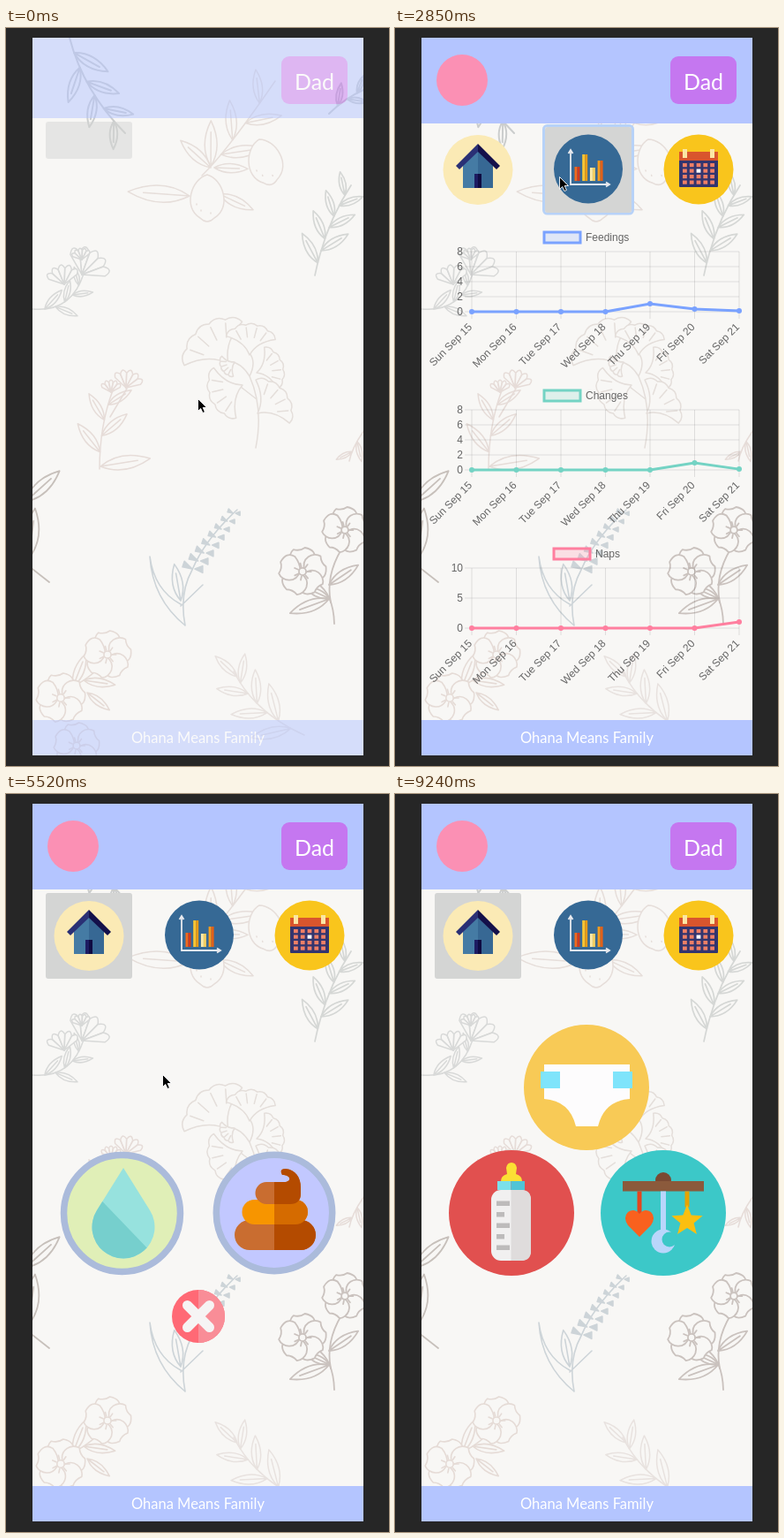
Animation of 434x835 px, one loop 9840 ms. Source, as an HTML page:

```html
<!DOCTYPE html>
<html lang="en">
<head>
<meta charset="utf-8">
<title>Baby tracker</title>
<style>
html, body { margin: 0; width: 100%; height: 100%; overflow: hidden; background: #262626; }
svg { display: block; width: 100vw; height: 100vh; }
text { font-family: Lato, sans-serif; font-weight: 400; }
.bold { font-family: "Liberation Sans", Arial, sans-serif; font-weight: 700; }
.plain { font-family: "Liberation Sans", Arial, sans-serif; }
.mid { text-anchor: middle; }
.end { text-anchor: end; }
#dodge { mix-blend-mode: color-dodge; }
</style>
</head>
<body>
<svg id="stage" viewBox="0 0 434 835" preserveAspectRatio="none"></svg>
<script>
const paper = '#f8f7f5';
const rect = (x, y, w, h, fill, more = '') =>
  `<rect x="${x}" y="${y}" width="${w}" height="${h}" fill="${fill}" ${more}/>`;
const disc = (x, y, r, fill, more = '') => `<circle cx="${x}" cy="${y}" r="${r}" fill="${fill}" ${more}/>`;
const path = (d, fill = 'none', more = '') => `<path d="${d}" fill="${fill}" ${more}/>`;
const line = (d, color, width, more = '') => path(d, 'none', `stroke="${color}" stroke-width="${width}" ${more}`);
const text = (x, y, size, str, cls = 'mid', fill = '#333', more = '') =>
  `<text x="${x}" y="${y}" font-size="${size}" class="${cls}" fill="${fill}" ${more}>${str}</text>`;
const group = (id, body) => `<g id="${id}">${body}</g>`;
const place = (x, y, turn, body) => `<g transform="translate(${x} ${y}) rotate(${turn})">${body}</g>`;
const repeat = (n, fn) => Array.from({ length: n }, (_, i) => fn(i)).join('');
const polar = (r, deg) => [r * Math.cos(deg * Math.PI / 180), r * Math.sin(deg * Math.PI / 180)].map(v => +v.toFixed(1));

// Botanical background
const leaf = (x, y, turn, len) => place(x, y, turn,
  path(`M0 0Q${len * .45} ${-len * .27} ${len} 0Q${len * .45} ${len * .27} 0 0H${len * .75}`));

// Curved stem with alternating leaves that shrink towards the tip
function sprig([x0, y0, cx, cy, x1, y1], n, len) {
  const bend = (a, b, c, t) => (1 - t) ** 2 * a + 2 * t * (1 - t) * b + t * t * c;
  const slope = (a, b, c, t) => (1 - t) * (b - a) + t * (c - b);
  return path(`M${x0} ${y0}Q${cx} ${cy} ${x1} ${y1}`) + repeat(n, i => {
    const t = (i + 1) / (n + 1);
    const turn = Math.atan2(slope(y0, cy, y1, t), slope(x0, cx, x1, t)) * 180 / Math.PI;
    return leaf(bend(x0, cx, x1, t), bend(y0, cy, y1, t), turn + (i % 2 ? 42 : -42), len * (1.1 - t * .4));
  });
}
function fan(x, y, turn, r) {
  const lobes = repeat(5, i => `Q${polar(r * 1.13, i * 22 - 44)} ${polar(r, i * 22 - 33)}`);
  const ribs = repeat(4, i => `M${polar(r * .6, i * 22 - 33)}L${polar(r * .92, i * 22 - 33)}`);
  return place(x, y, turn, path(`M0 0Q${polar(r * .5, -25)} ${polar(r, -55)}${lobes}Q${polar(r * .5, 25)} 0 0${ribs}`, paper));
}
function bloom(x, y, r) {
  const petal = `M${r * .1} 0C${r * .1} ${-r * .6} ${r * .7} ${-r * .65} ${r * .92} ${-r * .38}` +
    `Q${r * .85} ${-r * .1} ${r} ${r * .1}Q${r * .9} ${r * .6} ${r * .5} ${r * .5}Q${r * .2} ${r * .3} ${r * .1} 0`;
  return place(x, y, 0, repeat(5, i => place(0, 0, i * 72 - 90, path(petal, paper))) +
    disc(0, 0, r * .15, paper) + repeat(7, i => path(`M${polar(r * .2, i * 51)}L${polar(r * .36, i * 51)}`)));
}
const cup = (x, y, turn, r) => place(x, y, turn, repeat(5, i => place(0, 0, i * 25 - 50,
  path(`M0 0L${r * .75} ${-r * .16}Q${r * 1.1} 0 ${r * .75} ${r * .16}Z`, paper))));
const tuft = (x, y, s) => path(`M${x} ${y}l${-s} ${-s * .2}l${s * .2} ${-s * .6}ZM${x + 3} ${y}l${s * .8} ${-s * .3}v${s * .7}Z`, '#cdd4d8');
const ink = (color, width, ...parts) =>
  `<g stroke="${color}" stroke-width="${width}" fill="none" stroke-linecap="round" stroke-linejoin="round">${parts.join('')}</g>`;

const lemon = path('M0 -27C-18 -22 -28 10 -8 22Q0 30 8 22C28 10 18 -22 0 -27ZM-12 6v1M-7 13v1M4 16v1', paper);
const plants = [
  ink('#cbcdcd', 2, sprig([72, 11, 88, 72, 135, 119], 6, 42), sprig([366, 97, 385, 78, 410, 68], 3, 26)),
  ink('#e6deda', 1.5, sprig([222, 167, 250, 140, 305, 60], 5, 50), leaf(208, 190, 184, 70), leaf(242, 188, 25, 42),
    leaf(232, 158, 222, 46), leaf(236, 158, 2, 38), place(228, 193, 0, lemon), place(294, 152, -15, lemon)),
  ink('#d5d7d5', 1.7, sprig([350, 280, 362, 222, 391, 178], 7, 36)),
  ink('#d8d9d8', 1.5, sprig([30, 318, 74, 322, 88, 278], 5, 28), cup(86, 279, -58, 34), cup(66, 290, -100, 24), cup(86, 262, -100, 14)),
  ink('#e4deda', 1.5, path('M283 475Q292 430 276 394Q264 374 246 378M276 394Q284 378 276 368M284 420L266 406'),
    fan(252, 380, -127, 50), fan(276, 370, -86, 34), fan(284, 390, -18, 30), fan(268, 404, 156, 38), fan(285, 436, -38, 38), fan(259, 378, 150, 16)),
  ink('#e6dcd8', 1.5, sprig([106, 499, 106, 450, 121, 410], 4, 40), leaf(107, 496, -9, 57),
    cup(119, 412, -90, 15), cup(136, 407, -75, 22), path('M118 440L137 408'), sprig([406, 455, 392, 475, 389, 490], 2, 24)),
  ink('#c7c0bb', 1.8, leaf(22, 536, -42, 52), leaf(26, 600, -83, 57), path('M22 606L49 627')),
  ink('#cdd4d8', 1.6, path('M203 676Q196 640 211 613Q226 578 262 545M203 676Q166 646 163 598Q168 636 198 652M198 654L223 630'),
    leaf(198, 648, -100, 42), repeat(8, i => tuft(211 + i * 6.6, 612 - i * 9, 11 - i * .7))),
  ink('#cac2be', 1.8, sprig([372, 674, 371, 640, 352, 628], 1, 34), path('M368 650Q362 620 380 590'), leaf(366, 646, 160, 47),
    leaf(366, 630, -34, 40), bloom(336, 615, 27), bloom(384, 568, 26)),
  ink('#e5dbd6', 1.6, sprig([64, 750, 88, 742, 112, 718], 3, 40), leaf(92, 752, 38, 32), bloom(62, 758, 28), bloom(115, 709, 27), bloom(80, 812, 26)),
  ink('#e8e2df', 1.5, sprig([338, 800, 282, 775, 258, 728], 6, 44), leaf(262, 734, -137, 34))
].join('');

// Navigation
const tabX = [94, 219, 344];
const ring = x => rect(x - 50.5, 110.5, 101, 99.5, 'none', 'rx="4" stroke="#b7d2f8" stroke-width="3"');
const marks = tabX.map((x, i) => group('mark' + i, (i ? ring(x) : '') +
  rect(x - 49, 112, 98, 97, '#d4d5d4', `rx="3" id="tab${i}"`))).join('');
const bar = (i, h, a, b) => rect(203.5 + i * 8.7, 173 - h, 3, h, a) + rect(206.5 + i * 8.7, 173 - h, 3, h, b);
const icons =
  disc(76, 59, 29, '#fb90b4') + disc(94, 160.5, 39.5, '#fbeab5') +
  path('M77 152L94 137V181H77Z', '#457ba4') + path('M94 137L111 152V181H94Z', '#376894') +
  path('M94 131V140L73 160L69 156Z', '#2a3075') + path('M94 131L119 156L115 160L94 140Z', '#14104a') +
  rect(90, 165, 4, 16, '#1d1c62') + rect(94, 165, 4, 16, '#0f0b42') +
  disc(219, 159.5, 39, '#366995') +
  line('M199 139V177H242M196.500 142L199 138L201.500 142M239 174.500L243 177L239 179.500', '#e7e9ee', 1.8) +
  bar(0, 16, '#f26a1c', '#d2391c') + bar(1, 30, '#f9c634', '#e79b17') +
  bar(2, 15, '#fbeaa8', '#f3cf61') + bar(3, 23, '#f59c1d', '#e0611b') +
  disc(344, 160, 39.5, '#f9c51c') + rect(322, 140, 44, 40, '#33356e', 'rx="1"') + rect(322, 140, 44, 10, '#d9552d') +
  rect(326, 137, 5, 10, '#fbe6a4') + rect(357, 137, 5, 10, '#fbe6a4') +
  repeat(20, i => rect(326 + i % 5 * 7.8, 153 + Math.floor(i / 5) * 6.5, 4.8, 4.2, i == 7 ? '#fff' : '#ef7f66'));

// Home menu
const star = 'M' + Array.from({ length: 10 }, (_, i) => polar(i % 2 ? 8 : 18.5, i * 36 - 90)).join('L') + 'Z';
const home =
  disc(217, 332, 71, '#f8ca56') + path('M169 306H266V345Q237 347 230 376H205Q198 347 169 345Z', '#fdfcfd') +
  rect(165, 314, 22, 19, '#7fe4fb') + rect(247, 314, 22, 19, '#7fe4fb') +
  disc(132, 474, 71, '#e1504f') +
  path('M120 438Q120 432 127 430L126 423Q127 417 132 417Q137 417 138 423L137 430Q144 432 144 438Z', '#fbdf34') +
  rect(116, 438, 15.5, 10, '#7be0ea') + rect(131.5, 438, 15.5, 10, '#50c4d6') +
  rect(109, 448, 45, 80, '#f1f0f0', 'rx="11"') + path('M131.500 448H143Q154 448 154 459V517Q154 528 143 528H131.500Z', '#dfdcdc') +
  repeat(5, i => rect(115, 460.5 + i * 12.5, i % 2 ? 9 : 15, 5.5, '#bdbbbb')) +
  disc(304, 474, 71, '#3cc8c8') + disc(304, 437, 9, '#7a4a33') + rect(258, 438, 92, 11.5, '#8b5a3c') +
  rect(274.5, 449.5, 5, 26, '#e2461f') + rect(301, 449.5, 6, 44, '#b9d6fb') + rect(328.5, 449.5, 5, 18, '#e6a300') +
  path('M277 501L264 488Q258 479 264 473Q271 468 277 475Q283 468 290 473Q296 479 290 488Z', '#f9611e') +
  disc(304, 506, 13.5, '#b9d6fb') + disc(311, 504, 8.5, '#3cc8c8') +
  path(star, '#fbbf10', 'transform="translate(331 483)"');

// Diaper menu
const swirl = 'M295 439H313C324 440 324 431 313 431Q309 424 317 424C328 425 334 434 334 445V452Q334 464 322 464H295A12.500 12.500 0 0 1 295 439Z';
const pile = (a, b) => rect(259, 482, 92, 34, a, 'rx="17"') + rect(267.5, 459, 74.5, 28, b, 'rx="14"') + path(swirl, a);
const drop = 'M133 423L103 471A35.500 35.500 0 1 0 163 471Z';
const rim = 'stroke="#abbbdb" stroke-width="7.500"';
const diaper =
  disc(131.5, 474.5, 66, '#e0efb7', rim) + path(drop, '#97e2de') +
  path('M90 441L166 520L150 530H90Z', '#76cfcd', 'clip-path="url(#drop)"') +
  disc(304, 474, 65.7, '#c2c8ff', rim) + pile('#c96d30', '#f79500') +
  `<g clip-path="url(#half)">${pile('#b44b00', '#d56b00')}</g>`;
const cancel = disc(218, 591, 30, '#ff6975') + path('M218 561A30 30 0 0 1 218 621Z', '#f98d97') +
  line('M205.500 578.500l25 25m0 -25l-25 25', '#f6f4f4', 11, 'stroke-linecap="round"');

// Charts: flat until the peak day, then falling by a fixed ratio
const days = ['Sun', 'Mon', 'Tue', 'Wed', 'Thu', 'Fri', 'Sat'];
function chart(y, name, legendX, color, peak, height, ratio, top, step) {
  const rows = top / step + 1, dayX = i => 87 + i * 50.5, rowY = i => y - i * 68 / (rows - 1);
  const dots = days.map((_, i) => [dayX(i), y - (i < peak ? 0 : height / ratio ** (i - peak))]);
  const grid = repeat(rows, i => `M79 ${rowY(i)}H390`) + repeat(7, i => `M${dayX(i)} ${y - 68}V${y + 8}`);
  return rect(legendX, y - 90, 41, 12, color, `fill-opacity=".2" stroke="${color}" stroke-width="3"`) +
    text(legendX + 47, y - 80, 12, name, 'plain', '#666') + line(grid, '#000', 1, 'stroke-opacity=".1"') +
    repeat(rows, i => text(77, rowY(i) + 4, 12, i * step, 'plain end', '#666')) +
    line('M' + dots.join('L'), color, 3) + dots.map(([cx, cy]) => disc(cx, cy, 3, color)).join('') +
    days.map((d, i) => text(0, 0, 12, `${d} Sep ${15 + i}`, 'plain end', '#666',
      `transform="translate(${dayX(i) + 1} ${y + 18}) rotate(-45)"`)).join('');
}
const charts = chart(321, 'Feedings', 169, '#7aa2ff', 4, 9, 3, 8, 2) +
  chart(500, 'Changes', 169, '#74d3c4', 5, 8, 9, 8, 2) + chart(679, 'Naps', 180, '#ff7f9f', 6, 7, 1, 10, 5);

// Calendar: one digit of activity per day
const cellW = 375 / 7, hair = '#ebe9ea', frame = '#e6e6e6';
const heat = '031200000004010431', tints = ['none', '#f3e3ee', '#e2bedb', '#c1a4c1', '#b86aa1'];
function cell(i) {
  const x = 30 + i % 7 * cellW, y = 300.5 + Math.floor(i / 7) * 41;
  return rect(x, y, cellW, 41, tints[heat[i] || 0], `stroke="${hair}"`) +
    text(x + cellW - 13.5, y + 24, 13, i % 30 + 1, 'bold end', '#111');
}
const calendar = rect(30, 213, 375, 610, '#fdfdfd') + line('M30 213.500H405M30 266.500H405', hair, 1) +
  line('M58 233l-5 4l5 4M377 233l5 4l-5 4', '#111', 2) + text(217.5, 246, 20, 'SEPTEMBER 2019', 'bold mid', '#111') +
  days.map((d, i) => text(57 + i * cellW, 287, 11, d.toUpperCase())).join('') +
  repeat(35, cell) + text(217.5, 540, 22, 'Select a Date') +
  rect(32, 556, 371, 266, 'none', `stroke="${frame}" stroke-width="2"`) +
  line('M31 606H404' + repeat(3, i => `M${124.5 + i * 92.5} 556V606`), frame, 1.5) +
  ['Time', 'Type', 'Edit', 'Delete'].map((s, i) => text(78 + i * 92.7, 587, 16, s)).join('');

const popup = rect(39, 238, 357, 59, '#fff', 'rx="4"') + disc(95.5, 268, 12.5, '#98cc5c') +
  line('M89 268L94 273L103 263', '#fff', 2.5) + text(251, 273, 16, 'New entry has been recorded!', 'mid', '#222');
const pointer = path('M.5 .5V14.500L3.700 11.500L6 16.500L8.400 15.400L6.200 10.500H10.500Z', '#000', 'stroke="#fff" stroke-width=".9"');

document.getElementById('stage').innerHTML =
  `<defs><clipPath id="screen">${rect(30, 11, 375, 812, '#000')}</clipPath>` +
  `<clipPath id="half">${rect(304, 420, 60, 100, '#000')}</clipPath><clipPath id="drop">${path(drop, '#000')}</clipPath></defs>` +
  rect(0, 0, 434, 835, '#262626') + rect(30, 11, 375, 812, paper) + `<g clip-path="url(#screen)">${plants}</g>` +
  rect(30, 108, 375, 105, '#060606', 'id="dodge"') +
  group('app', rect(30, 11, 375, 97, '#b4c5ff', 'id="header"') + rect(30, 783, 375, 40, '#b4c5ff') +
    text(217.5, 809, 16.5, 'Ohana Means Family', 'mid', '#fff') +
    rect(312, 32, 75, 54, '#c577f0', 'rx="9"') + text(349.5, 69.5, 25, 'Dad', 'mid', '#fff') + marks + group('icons', icons)) +
  group('charts', charts) + group('calendar', calendar) + group('home', home) + group('diaper', diaper) +
  group('cancel', cancel) + group('shade', rect(30, 11, 375, 812, '#000', 'opacity=".46"')) + group('popup', popup) + group('cursor', pointer);

// Visible spans in steps: [from, to, rise, fall]
const spans = {
  app: [[-3, 99, 6]], icons: [[0, 99]], cursor: [[-1, 62]],
  home: [[0, 13, 7], [29, 34, 3], [50, 99, 2]],
  mark0: [[-1, 16, 1, 3], [29, 99, 2]], mark1: [[13, 23, 3, 2]], mark2: [[21, 31, 2, 2]],
  charts: [[12, 22, 7]], calendar: [[21, 30, 3]], dodge: [[21, 30, 3]],
  diaper: [[33, 51, 4]], cancel: [[33, 44, 4]],
  shade: [[44, 50, 2, 2]], popup: [[44, 50, 3, 2]]
};
const level = (k, [from, to, rise = 1, fall = 1]) => Math.max(0, Math.min(1, (k - from) / rise, (to - k) / fall));

// Pointer stops: [arrive, leave, x, y], slowing down into each
const stops = [[0, 5, 217, 419], [9, 20, 186, 168], [22, 24, 342, 166], [28, 30, 83, 173], [33, 37, 177, 317],
  [43, 46, 142, 488], [50, 50, 166, 490], [55, 56, 122, 523], [61, 62, 329, 809]];
function pointerAt(k) {
  const i = stops.findLastIndex(s => s[0] <= k), [, leave, x, y] = stops[i], next = stops[i + 1];
  if (!next || k <= leave) return [x, y];
  const u = 1 - (1 - (k - leave) / (next[0] - leave)) ** 1.7;
  return [x + (next[2] - x) * u, y + (next[3] - y) * u];
}

const el = id => document.getElementById(id);
const LOOP = 9840;
// Screen refreshes every 150 ms, slightly faster after 4 s
const stepAt = t => t < 4050 ? Math.floor(t / 150) : Math.min(62, 27 + Math.floor((t - 4038) / 148.1));

function draw(k) {
  for (const id in spans) {
    const v = Math.max(...spans[id].map(s => level(k, s)));
    el(id).setAttribute('opacity', v);
    el(id).setAttribute('visibility', v ? 'visible' : 'hidden');
  }
  el('cursor').setAttribute('transform', `translate(${pointerAt(k)})`);
  // Before the icons load, the bars are shorter
  el('header').setAttribute('height', k ? 97 : 91);
  el('tab0').setAttribute('y', k ? 112 : 106);
  el('tab0').setAttribute('height', k ? 97 : 42);
}

const start = performance.now();
let shown = 0;
draw(0);
requestAnimationFrame(function tick() {
  const k = stepAt((performance.now() - start) % LOOP);
  if (k !== shown) draw(shown = k);
  requestAnimationFrame(tick);
});
</script>
</body>
</html>
```
